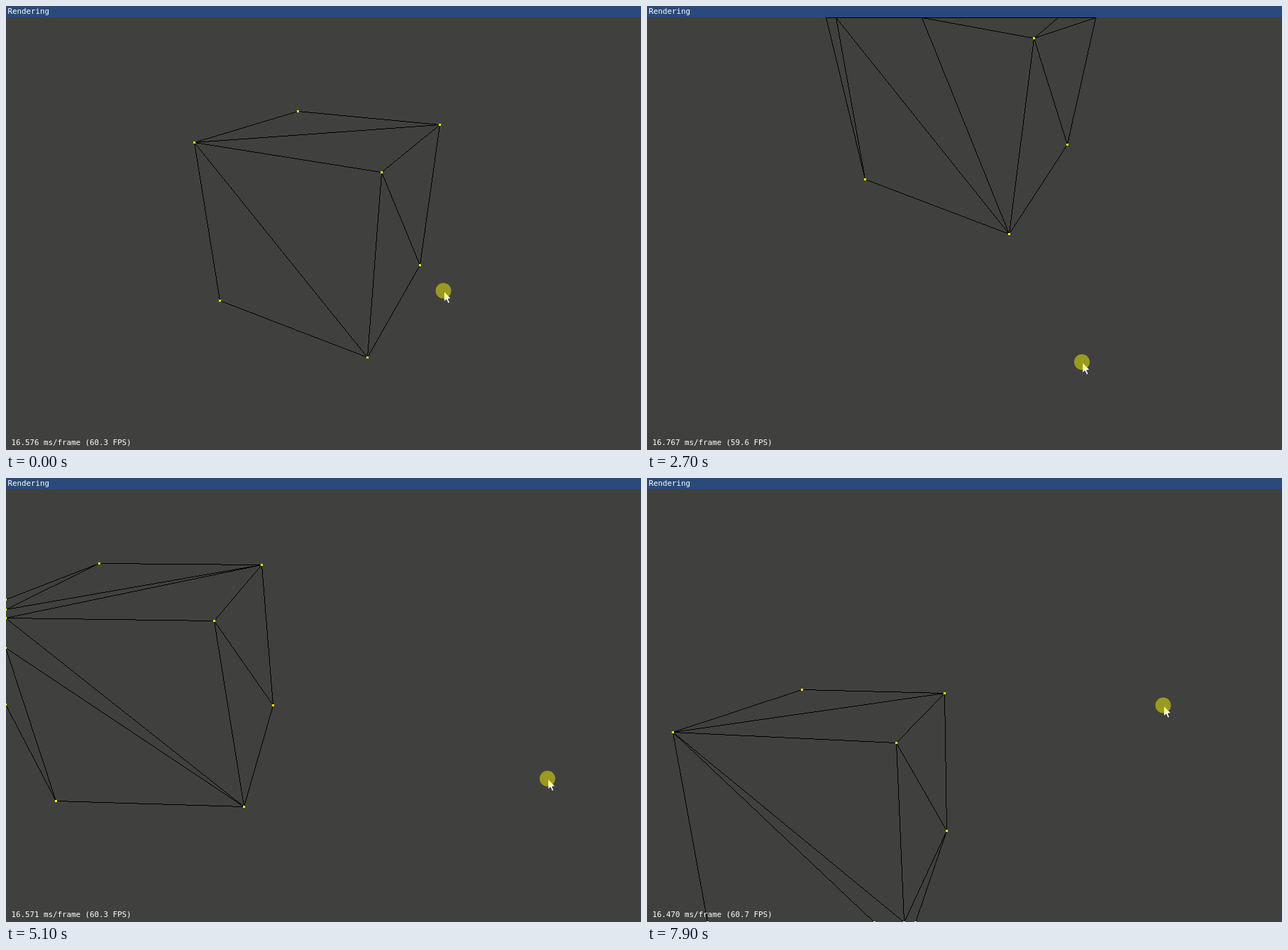
Write an HTML page with a canvas that moves like this. It is 895 px wide and 626 px high and loops after 8000 ms.

```html
<!DOCTYPE html>
<html lang="en">
<head>
<meta charset="utf-8">
<title>Rendering</title>
<style>
  html, body { margin: 0; width: 100%; height: 100%; overflow: hidden; background: #40403e; }
  canvas { display: block; }
</style>
</head>
<body>
<canvas id="stage" width="895" height="626"></canvas>
<script>
const W = 895, H = 626, TOP = 16, LOOP = 8000, STEP = 100;
const ctx = document.getElementById('stage').getContext('2d');

// Fixed camera with a 60 degree vertical field of view below the title bar.
const CX = W / 2, CY = (TOP + H) / 2;
const FOCAL = (H - TOP) / 2 / Math.tan(Math.PI / 6);
const START_PITCH = 0.487;

// Dragging turns the camera; the view trails the cursor slightly.
const YAW_PER_PX = 0.00312, PITCH_PER_PX = 0.00319, LAG = 20;

// Key points of the drag: time, cursor x, cursor y
const DRAG = [
  [0, 616.5, 401.5], [860, 617.5, 464.5], [1800, 616, 499], [2250, 616, 499],
  [2700, 613, 502], [3100, 614, 495], [4000, 621, 425], [4400, 698.5, 425],
  [4900, 747, 424], [5600, 803.5, 423], [6100, 803.5, 423], [7100, 803.5, 342],
  [7500, 805, 326], [7885, 727.5, 320.5]
];

// Time, milliseconds per rendered frame
const TIMING = [[0, 16.576], [900, 16.797], [2700, 16.767], [4400, 16.734],
                [5900, 16.384], [7100, 16.534], [7900, 16.47]];

// Unit cube seen from the camera: right, down, forward, and its turn.
const CUBE = { x: 0.0245, y: 0.978, z: 2.093, turn: 0.4913 };

// Corner numbers are bit masks: 1 = right, 2 = back, 4 = bottom.
const TRIANGLES = ['023', '031', '501', '540', '137', '175'];

function corner(mask) {
  const [u, v, w] = [1, 2, 4].map(bit => mask & bit ? 0.5 : -0.5);
  const c = Math.cos(CUBE.turn), s = Math.sin(CUBE.turn);
  return [CUBE.x + u * c + v * s, CUBE.y + w, CUBE.z - u * s + v * c];
}

function project([x, y, z], yaw, pitch) {
  const side = x * Math.cos(yaw) + z * Math.sin(yaw);
  const forward = z * Math.cos(yaw) - x * Math.sin(yaw);
  const c = Math.cos(pitch), s = Math.sin(pitch);
  const scale = FOCAL / (forward * c + y * s);
  return [CX + side * scale, CY + (y * c - forward * s) * scale];
}

const mix = (a, b, u) => a.map((v, i) => v + (b[i] - v) * u);

function sample(keys, t) {
  const next = Math.max(1, keys.findIndex(k => k[0] >= t));
  const [a, b] = t > keys.at(-1)[0] ? [keys.at(-1), keys.at(-1)] : [keys[next - 1], keys[next]];
  const u = a === b ? 0 : Math.max(0, (t - a[0]) / (b[0] - a[0]));
  return mix(a, b, u).slice(1);
}

// Keeps the part of a polygon where sign * (p[axis] - limit) >= 0.
function clip(poly, [axis, limit, sign]) {
  const inside = p => sign * (p[axis] - limit) >= 0;
  const out = [];
  poly.forEach((p, i) => {
    const prev = poly.at(i - 1);
    if (inside(p) !== inside(prev)) {
      const cut = mix(prev, p, (limit - prev[axis]) / (p[axis] - prev[axis]));
      cut[axis] = limit;
      out.push(cut);
    }
    if (inside(p)) out.push(p);
  });
  return out;
}

const BORDERS = [[0, -1, 1], [0, W, -1], [1, TOP, 1], [1, H, -1]];

function pixelLine(p, q) {
  const a = p.map(Math.floor), b = q.map(Math.floor);
  const n = Math.max(Math.abs(b[0] - a[0]), Math.abs(b[1] - a[1])) || 1;
  for (let i = 0; i <= n; i++) ctx.fillRect(...mix(a, b, i / n).map(Math.round), 1, 1);
}

function drawCube(yaw, pitch) {
  const polys = TRIANGLES.map(tri =>
    BORDERS.reduce(clip, [...tri].map(n => project(corner(+n), yaw, pitch))));

  ctx.fillStyle = '#000';
  for (const poly of polys) {
    poly.forEach((p, i) => {
      pixelLine(poly.at(i - 1), p);
      if (i > 1 && i < poly.length - 1) pixelLine(poly[0], p);
    });
  }
  for (const [x, y] of polys.flat()) {
    if (y <= TOP + 1) continue;
    ctx.fillStyle = y > H - 1 ? '#ddd' : '#ff0';
    ctx.fillRect(Math.floor(x) - 1, Math.floor(y) - 1, 3, 3);
  }
}

const ARROW = new Path2D('M0 0V15L3.4 11.8L5.8 17.2L8.2 16.2L5.9 11L10.2 10.6Z');

function drawCursor(x, y) {
  ctx.save();
  ctx.translate(x + 0.8, y + 0.5);
  ctx.fillStyle = '#fff';
  ctx.fill(ARROW);
  ctx.strokeStyle = '#222';
  ctx.lineWidth = 0.8;
  ctx.stroke(ARROW);
  ctx.restore();
  ctx.beginPath();
  ctx.arc(x, y, 11, 0, Math.PI * 2);
  ctx.fillStyle = 'rgba(255,255,0,0.47)';
  ctx.fill();
}

function drawText(text, x, y) {
  ctx.fillStyle = '#fff';
  ctx.font = '10.8px "DejaVu Sans Mono", monospace';
  ctx.fillText(text, x, y);
}

function draw(t) {
  const [ms] = sample(TIMING, t);
  const [viewX, viewY] = sample(DRAG, t - LAG);
  const yaw = (DRAG[0][1] - viewX) * YAW_PER_PX;
  const pitch = START_PITCH + (viewY - DRAG[0][2]) * PITCH_PER_PX;

  ctx.fillStyle = '#40403e';
  ctx.fillRect(0, 0, W, H);
  drawCube(yaw, pitch);
  ctx.fillStyle = '#294a7a';
  ctx.fillRect(0, 0, W, TOP);
  drawText('Rendering', 2.5, 11);
  drawText(`${ms.toFixed(3)} ms/frame (${(1000 / ms).toFixed(1)} FPS)`, 7.5, 619);
  drawCursor(...sample(DRAG, t));
}

let start = null, shown = -1;
function tick(now) {
  start ??= now;
  const t = Math.floor((now - start) % LOOP / STEP) * STEP;
  if (t !== shown) draw(shown = t);
  requestAnimationFrame(tick);
}
draw(0);
requestAnimationFrame(tick);
</script>
</body>
</html>
```
